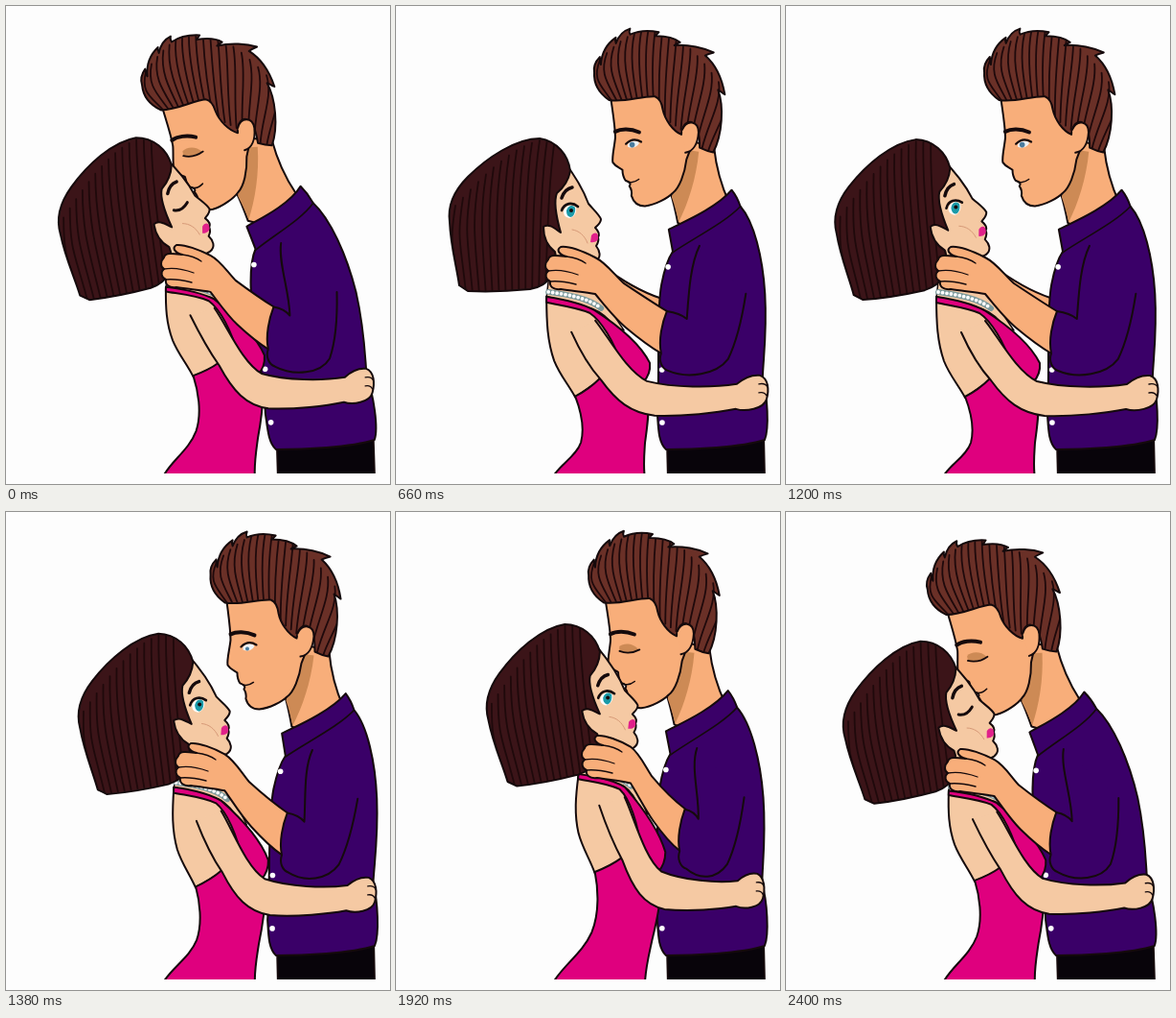
These frames come from a looping animation (401x498 px, 2460 ms). An HTML page with a canvas:

```html
<!DOCTYPE html>
<html lang="en">
<head>
<meta charset="utf-8">
<title>Couple</title>
<style>
html, body { margin: 0; width: 100%; height: 100%; overflow: hidden; background: #fdfdfd; }
canvas { display: block; width: 401px; height: 498px; }
</style>
</head>
<body>
<canvas id="stage" width="401" height="498"></canvas>
<script>
const ctx = document.getElementById('stage').getContext('2d');
const LOOP = 2460, STEP = 60;

const INK = '#150a0c', SKIN = '#f8ae7a', SHADE = '#cd8a55', PALE = '#f5c9a3',
  SHIRT = '#3a0068', DRESS = '#df007e', BROWN = '#6a3027', DARK = '#3b1418';

// lean: his shift in px, rise: she reaches up, hug: embrace, tilt: her head in degrees
const KEYS = [
  { at: 0, lean: -61, rise: 0.1, hug: 1, tilt: -9 },
  { at: 360, lean: -20, rise: 0, hug: 0.1, tilt: 0 },
  { at: 900, lean: 0, rise: 0, hug: 0, tilt: 0 },
  { at: 1200, lean: -5, rise: 0, hug: 0, tilt: -7 },
  { at: 1560, lean: 6, rise: 1, hug: 1, tilt: -6 },
  { at: 1920, lean: -10, rise: 0.9, hug: 1, tilt: -7 },
  { at: 2400, lean: -56, rise: 0.2, hug: 1, tilt: -9 }
];

const clamp = v => Math.min(1, Math.max(0, v));
const smooth = v => (v = clamp(v), v * v * (3 - 2 * v));
const mix = (a, b, u) => a + (b - a) * u;
const range = (n, f) => Array.from({ length: n }, (_, i) => f(i, i / (n - 1)));

// Monotone cubic interpolation around the loop
function channel(name, t) {
  const n = KEYS.length, key = i => KEYS[(i + n) % n];
  const span = i => (key(i + 1).at - key(i).at + LOOP) % LOOP;
  const slope = i => (key(i + 1)[name] - key(i)[name]) / span(i);
  const tangent = i => {
    const p = slope(i - 1), q = slope(i);
    return p * q > 0 ? 2 * p * q / (p + q) : 0;
  };
  let k = n - 1;
  while (KEYS[k].at > t) k--;
  const h = span(k), u = (t - key(k).at) / h, v = 1 - u;
  return v * v * (1 + 2 * u) * key(k)[name] + u * u * (3 - 2 * u) * key(k + 1)[name]
    + h * u * v * (v * tangent(k) - u * tangent(k + 1));
}

function rigid(px, py, dx, dy, deg) {
  const c = Math.cos(deg * Math.PI / 180), s = Math.sin(deg * Math.PI / 180);
  return (x, y) => [px + dx + (x - px) * c - (y - py) * s, py + dy + (x - px) * s + (y - py) * c];
}

// One warp per body part, all driven by the four channels
function rig({ lean, rise, hug, tilt }) {
  const lift = 0.05 * lean - 5 * rise;
  const torso = (x, y) => {
    const k = Math.max(0, (460 - y) / 240) ** 1.5;
    return [x + (0.65 * lean + 2) * k, y + lift * k];
  };
  const cuff = (x, y) => [x + 28 * rise - 6 * hug, y - 5 * rise - 4 * hug];
  const blend = (a, b, u) => a.map((v, i) => mix(v, b[i], u));
  const sleeve = (x, y) =>
    blend(cuff(x, y), torso(x, y), smooth(Math.max((x - 280) / 60, (325 - y) / 70)));
  const forearm = (x, y) =>
    blend([x + 40 * rise + 2 * hug, y - 20 * rise], cuff(x, y), smooth((x - 195) / 90));
  const her = (x, y) => {
    const s = Math.max(0, (487 - y) / 187), reach = rise * s ** 0.8;
    const near = clamp((395 - x) / 185), loose = hug * clamp(4 * s);
    const arch = clamp((240 - x) / 50) * Math.sin(Math.PI * clamp(s));
    return [x + 30 * reach * near + loose * (12 * near - 5),
      y - 25 * reach * near - 7 * loose - 14 * hug * arch];
  };
  const herHead = deg => rigid(120, 215, 48 * rise + 0.7 * tilt, -24 * rise - 0.6 * tilt, deg);
  return {
    torso: pen(torso), sleeve: pen(sleeve), forearm: pen(forearm), her: pen(her),
    hisHead: pen(rigid(313, 135, lean, lift, 0.16 * lean)),
    herFace: pen(herHead(tilt * (1 - 0.8 * rise))),
    herHair: pen(herHead(tilt - 2 * rise))
  };
}

// Drawing tools that follow a warp
function pen(warp) {
  const shape = d => new Path2D(d.replace(/(-?[\d.]+),(-?[\d.]+)/g,
    (_, x, y) => warp(+x, +y).map(v => v.toFixed(2)).join()));
  const stroke = (s, width, color = INK) => {
    ctx.lineWidth = width;
    ctx.strokeStyle = color;
    ctx.stroke(s);
  };
  const fill = (d, color, width = 2) => {
    const s = shape(d);
    ctx.fillStyle = color;
    ctx.fill(s);
    if (width) stroke(s, width);
    return s;
  };
  const line = (d, width = 1.6, color = INK) => stroke(shape(d), width, color);
  const dot = (x, y, r, color) => {
    ctx.beginPath();
    ctx.arc(...warp(x, y), r, 0, 7);
    ctx.fillStyle = color;
    ctx.fill();
  };
  const hair = (d, color, strands) => {
    const s = fill(d, color, 0);
    ctx.save();
    ctx.clip(s);
    strands.forEach(q => line(q, 1.8, '#1f090b'));
    ctx.restore();
    stroke(s, 2);
  };
  return { fill, line, dot, hair };
}

// Strands fan from the hairline to the crown
const hisStrands = range(20, (i, u) => {
  const x = mix(226, 330, u), y = 99 + 55 * u * u;
  const topX = mix(212, 350, u), topY = 62 - 44 * Math.sin(Math.PI * u) + 28 * u * u;
  return `M${x},${y} C${x - 12 + 20 * u},${mix(y, topY, 0.4)} ${topX - 10 + 14 * u},${topY + 22} ${topX},${topY}`;
});
const herStrands = range(14, (i, u) => {
  const x = mix(62, 166, u), y = 208 - 70 * Math.sin(u * Math.PI / 2);
  return `M${x},${y} C${x - 7},${y + 45} ${mix(60, 158, u)},245 ${mix(66, 156, u)},298`;
});

function drawHisHead(p, t) {
  p.fill('M291,195 C294,205 296,215 298,226 L320,236 L352,206 C344,188 339,170 337,148 L310,140 Z', SKIN);
  p.fill('M306,150 L292,199 C295,208 297,216 299,225 C309,206 318,180 321,152 Z', SHADE, 0);
  p.fill('M230,96 C232,112 234,125 234,136 C233,146 230,156 231,162 C234,167 239,168 241,170'
    + ' C241,174 242,178 244,181 C249,183 250,185 248,187 C250,190 251,192 250,197'
    + ' C252,204 256,208 264,208 C275,207 288,200 293,195 C300,190 306,175 308,160 L320,130 L290,90 Z', SKIN);
  p.hair('M228,97 C218,90 212,80 213,68 C212,62 215,56 219,52 C219,56 219,58 220,60'
    + ' C221,46 227,38 236,32 C235,35 235,36 236,38 C239,30 244,25 251,23 C250,25 250,27 251,29'
    + ' C260,25 272,25 281,27 C279,29 278,30 277,31 C288,31 297,33 303,38 C300,39 298,40 297,41'
    + ' C312,40 328,44 338,49 C334,50 331,51 329,52 C338,60 346,74 349,93 C346,91 344,89 342,88'
    + ' C348,105 346,135 336,153 C331,152 326,150 322,148 C322,135 321,124 313,121'
    + ' C306,121 304,127 303,134 C294,130 286,118 284,108 C283,100 281,96 276,94 C262,93 245,100 228,97 Z',
    BROWN, hisStrands);
  p.fill('M304,129 C309,118 321,120 321,132 C320,144 315,152 307,153', SKIN);
  p.line('M234,130 C240,127 250,127 259,131', 4);
  p.line('M246,182 C250,184 254,183 258,180', 1.5);
  if (t < 180 || t >= 1740) {
    p.fill('M243,143 C248,139 258,140 263,147 C257,150 250,150 243,148 Z', SHADE, 0);
    p.line('M243,148 C250,151 258,150 264,147', 1.8);
    return;
  }
  const low = t < 600 || t >= 1380;
  p.fill('M247,143 C251,139 256,139 259,142 C257,147 251,148 247,146 Z', '#eef3f6', 0);
  p.dot(251.5, low ? 145 : 144, low ? 2 : 2.8, '#4a7c9e');
  p.line('M245,143 C250,138 256,138 261,141', 2.2);
}

function drawTorso(p) {
  p.fill('M283,452 L384,448 L385,492 L284,492 Z', '#08040a');
  p.fill('M286,233 C295,228 335,212 352,192 C356,197 359,203 361,209 C375,225 384,262 386,300'
    + ' C388,340 384,365 383,388 C388,405 390,440 385,452 C360,460 310,462 282,462'
    + ' C274,455 274,440 273,425 C276,380 272,320 278,290 C281,275 284,265 290,256 Z', SHIRT);
  p.line('M290,257 C310,243 345,226 361,209');
  [[285, 272], [278, 379], [278, 434]].forEach(([x, y]) => p.dot(x, y, 2.8, '#fff'));
}

function drawHerBody(p) {
  p.fill('M160,278 L206,280 C210,295 220,312 238,338 L200,330 L157,304 Z', PALE, 1.5);
  const pearls = 'M159,298 C180,301 200,304 214,315';
  p.line(pearls, 6, '#7d9a9c');
  ctx.setLineDash([0, 4.5]);
  p.line(pearls, 3.8, '#fff');
  ctx.setLineDash([]);
  p.fill('M157,303 C157,330 158,350 165,370 C171,385 180,395 187,408 L213,390 L240,372 C240,345 222,322 205,316 Z', PALE);
  p.fill('M187,407 C195,403 205,396 213,388 L262,395 C266,415 262,440 260,455'
    + ' C259,470 258,480 260,492 L163,492 C170,478 188,470 193,455 C197,440 192,420 187,407 Z', DRESS);
  p.fill('M157,303 C170,305 190,308 207,317 C235,335 255,352 265,372 C266,382 262,388 258,392'
    + ' L235,374 C228,350 214,328 202,320 C188,314 170,312 157,309 Z', DRESS);
}

function drawHerArm(p) {
  p.fill('M183,340 C192,360 203,378 214,390 C230,412 245,424 270,427 C300,428 335,424 355,420'
    + ' C365,423 384,420 387,410 C390,400 389,388 380,385 C370,384 362,389 356,394'
    + ' C330,398 290,398 262,391 C240,380 222,345 208,328', PALE);
  p.line('M379,394 C384,393 387,395 388,397 M379,403 C384,402 386,404 387,406', 1.3);
}

function drawHerHead(face, hair, t) {
  face.fill('M174,160 C188,178 197,195 201,206 C206,212 212,217 214,222 C214,226 211,228 208,231'
    + ' C211,234 213,238 211,241 C212,244 211,247 209,250 C213,255 215,262 208,266'
    + ' C195,272 178,268 165,262 C158,262 150,245 152,232 L140,190 Z', PALE);
  hair.hair('M182,172 C180,155 168,141 150,138 C125,138 95,158 75,178 C58,195 54,210 56,225'
    + ' C57,250 63,270 66,291 C69,293 72,295 75,297 C95,298 120,297 140,295'
    + ' C150,293 157,290 160,283 C166,268 168,262 166,256 C158,250 154,240 154,230'
    + ' C160,226 166,232 172,236 C168,222 164,205 168,195 C174,190 180,182 182,172 Z',
    DARK, herStrands);
  face.line('M173,200 C175,194 179,190 184,189', 3.5);
  face.line('M184,233 C191,234 197,239 200,247', 1, '#d79a78');
  face.fill('M204,239 C207,235 211,236 211,240 C212,244 208,247 203,246 Z', '#e0218a', 0);
  if (t < 600 || t >= 2160) {
    face.line('M177,218 C183,220 188,217 192,212', 3);
    return;
  }
  face.fill('M175,214 C177,207 184,206 188,210 C189,215 186,220 181,221 C177,220 175,218 175,214 Z', '#fff', 0);
  face.fill('M178,213 C180,207 185,207 187,210 C188,215 185,220 182,220 C179,219 178,217 178,213 Z', '#1b9aa8', 0);
  face.dot(183, 213, 2, INK);
  face.line('M173,213 C176,205 184,204 190,209', 2.6);
}

function drawHisArm(arm, sleeve) {
  arm.fill('M283,318 C268,309 250,297 238,289 C228,280 220,268 208,262 C196,256 180,250 172,251'
    + ' C167,254 170,259 178,261 C170,260 160,258 159,264 C155,268 155,274 159,276'
    + ' C155,279 156,285 161,287 C160,292 164,296 172,295 C185,297 198,298 208,300'
    + ' C218,312 228,325 240,335 C252,345 265,355 277,362 L300,345 Z', SKIN);
  arm.line('M178,261 C187,262 194,265 198,268 M159,276 C170,274 182,277 190,280 M161,287 C170,286 180,288 188,290', 1.3);
  sleeve.fill('M318,250 C308,270 306,300 304,326 C298,321 290,319 283,318 C278,330 274,348 277,362'
    + ' C274,370 278,378 284,380 C305,389 335,384 347,368 C356,350 362,325 366,300', SHIRT);
}

function draw(t) {
  const pose = {};
  for (const name of ['lean', 'rise', 'hug', 'tilt']) pose[name] = channel(name, t);
  const part = rig(pose);
  ctx.fillStyle = '#fdfdfd';
  ctx.fillRect(0, 0, 401, 498);
  ctx.save();
  ctx.beginPath();
  ctx.rect(0, 0, 401, 487);
  ctx.clip();
  ctx.lineCap = ctx.lineJoin = 'round';

  drawHisHead(part.hisHead, t);
  ctx.save();
  ctx.translate(0, 16 * pose.hug);
  part.forearm.fill('M215,270 C235,285 255,297 276,304 L276,318 C250,306 232,296 215,285 Z', SKIN);
  ctx.restore();
  drawTorso(part.torso);
  drawHerBody(part.her);
  drawHerArm(part.her);
  drawHerHead(part.herFace, part.herHair, t);
  drawHisArm(part.forearm, part.sleeve);
  ctx.restore();
}

function tick() {
  draw(Math.floor(performance.now() % LOOP / STEP) * STEP);
  requestAnimationFrame(tick);
}
tick();
</script>
</body>
</html>
```
